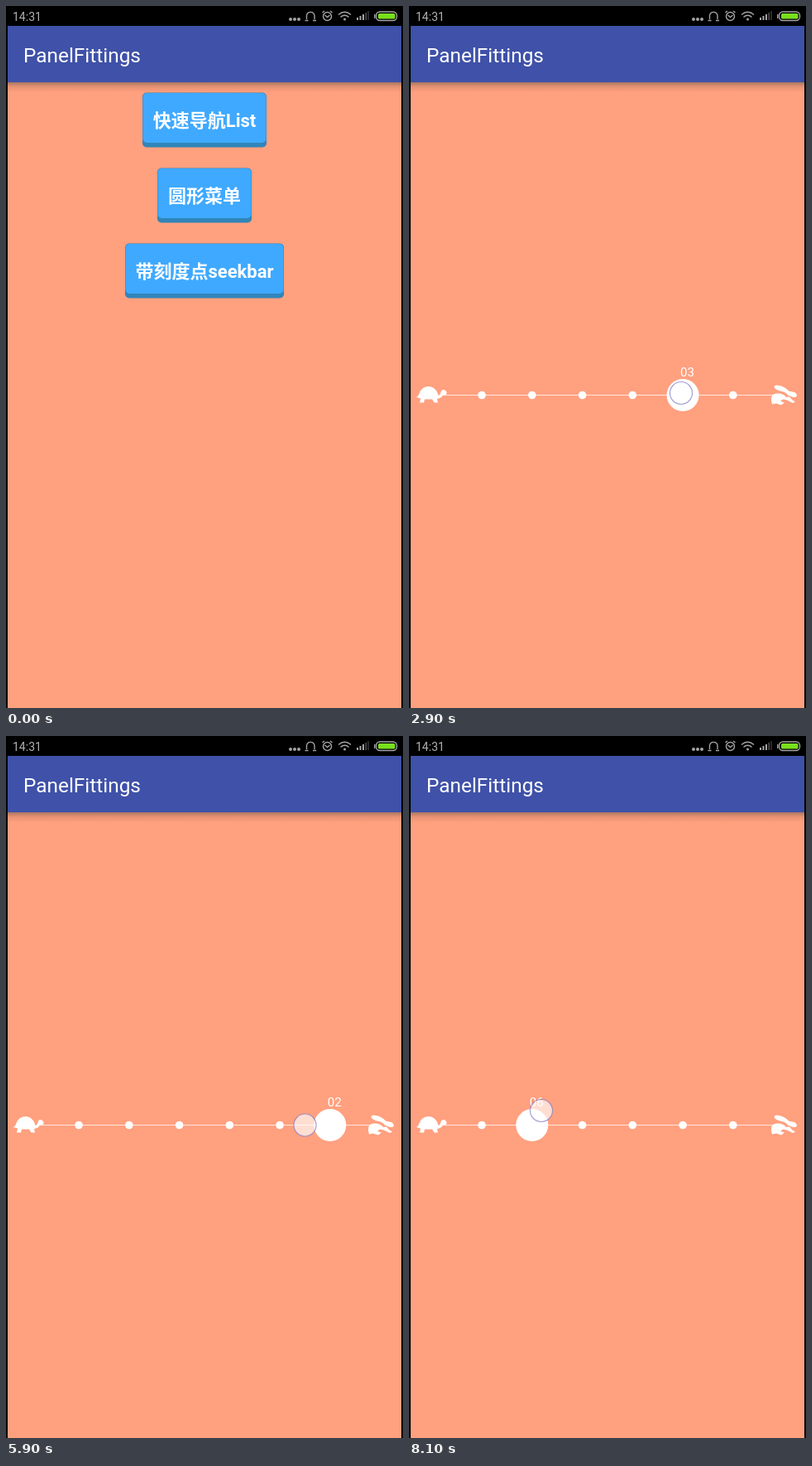
These frames come from a looping animation (480x847 px, 8200 ms). An HTML page:

```html
<!DOCTYPE html>
<html lang="zh">
<head>
<meta charset="utf-8">
<style>
html, body { margin: 0; width: 100%; height: 100%; overflow: hidden; background: #000; }
svg { display: block; width: 480px; height: 847px; }
text { font-family: Roboto, "Noto Sans CJK SC", "Noto Sans CJK", sans-serif; fill: #fff; }
.button text { font-size: 22px; font-weight: 700; text-anchor: middle; }
.line { fill: none; stroke: #a4a4a4; stroke-width: 1.4; }
</style>
</head>
<body>
<svg viewBox="0 0 480 847">
  <defs>
    <linearGradient id="shade" x2="0" y2="1">
      <stop stop-color="#a87662"/><stop offset=".45" stop-color="#e69273"/>
      <stop offset="1" stop-color="#ffa07f"/>
    </linearGradient>
    <g id="page">
      <rect y="24" width="480" height="823" fill="#ffa07f"/>
      <rect y="92" width="480" height="12" fill="url(#shade)"/>
      <rect y="24" width="480" height="68" fill="#3f51a8"/>
      <text x="21" y="68" font-size="24.4">PanelFittings</text>
    </g>
  </defs>

  <g id="home"><use href="#page"/></g>

  <g id="seek">
    <use href="#page"/>
    <path d="M40 469.5H442" stroke="#fff" stroke-opacity=".75"/>
    <g id="dots" fill="#fff"></g>
    <g fill="#fff">
      <path d="M9 472Q12 470 12.500 467Q16 459 23.500 459Q31 459 34.500 467L35.500 470Q38 469 38.500 466Q39 463 42 463Q46 464 45.500 468Q43 470 41 469Q40 473 34 474L35 478.500H30.500L28 474.500H19L18 478.500H13L14 473.500Z"/>
      <path d="M441.500 459.500Q442 456.500 448 458Q455 459.500 459 464.500L466 466Q469 467.500 469 470.500Q467 473 463 471.500L458 469.500Q456 466 451 465Q442 463 441.500 459.500Z"/>
      <path d="M438 476Q437 467 446 467.500Q453 467.500 456 472L460 471.500L463 475L467 477.500L464 479L457 475.500L452 474.500L449 477L454 478.500L450 481.500L444 479.500L439 480.500Z"/>
    </g>
    <g id="thumb">
      <circle cy="469.500" r="19.500" fill="#fff"/>
      <text id="label" x="-3" y="446.500" font-size="15"></text>
    </g>
  </g>

  <circle id="finger" r="13.500" fill="#fff" fill-opacity=".65" stroke="#857dc4" stroke-opacity=".75" stroke-width="1.200"/>

  <path d="M0 0H480V847H478V24H2V847H0Z"/>
  <text x="8" y="17.500" font-size="14" style="fill:#b0b0b0">14:31</text>
  <g fill="#a4a4a4">
    <circle cx="344" cy="16" r="2"/><circle cx="349" cy="16" r="2"/><circle cx="354" cy="16" r="2"/>
    <path d="M424 14h2v3h-2zM427.500 12h2v5h-2zM431 10h2v7h-2z"/>
    <path d="M434.500 8h1.500v9h-1.500zM437.500 6h1v11h-1z" fill="#555"/>
    <circle cx="409.500" cy="16" r="1.500"/>
  </g>
  <g class="line">
    <path d="M363.500 16V11.500A4.800 4.800 0 0 1 373 11.500V16M361.500 17.500H365.500M371 17.500H375"/>
    <circle cx="388.500" cy="12.500" r="5"/>
    <path d="M385.500 11L388.500 13.500L391.500 11M382.500 8L385 6M392 6L394.500 8"/>
    <path d="M402 10.500Q409.500 4 417 10.500M404.500 13.500Q409.500 9 414.500 13.500"/>
    <rect x="447.500" y="7" width="25" height="10.500" rx="4.500"/>
    <path d="M445.700 10V15"/>
  </g>
  <rect x="450" y="9" width="20.500" height="6.500" rx="1.500" fill="#78e01c"/>
</svg>
<script>
const $ = id => document.getElementById(id);
const move = (id, x, y = 0) => $(id).setAttribute("transform", `translate(${x} ${y})`);
const LOOP = 8200, STEP = 100;
const stopX = i => 27.3 + 60.75 * i;

const buttons = [
  ["list", "快速导航List", 104.5, 150],
  ["menu", "圆形菜单", 195.5, 114],
  ["ticks", "带刻度点seekbar", 286.5, 192]
];
$("home").innerHTML += buttons.map(([id, label, y, w]) => `
  <g class="button">
    <rect x="${240 - w / 2}" y="${y}" width="${w}" height="66" rx="5" fill="#3185b8"/>
    <g id="${id}">
      <rect x="${240.5 - w / 2}" y="${y + 0.5}" width="${w - 1}" height="60" rx="5" fill="#3fa9ff"/>
      <text x="240" y="${y + 41.5}">${label}</text>
    </g>
  </g>`).join("");

for (let i = 1; i < 7; i++)
  $("dots").innerHTML += `<circle cx="${stopX(i)}" cy="469.500" r="4.800"/>`;

// Each gesture is a list of [time, x, y]; the finger lifts after the last point.
const press = [[1500, 250, 322], [1900, 250, 322]];
const drags = [
  [[2900, 329, 467], [3700, 186, 457], [4000, 140, 455]],
  [[4800, 150, 462], [5300, 273, 464], [6500, 450, 475], [6600, 451, 475]],
  [[7000, 450, 473], [8100, 160, 452]]
];

function pointAt(path, t) {
  const n = path.findIndex(p => p[0] >= t);
  if (n < 0 || t < path[0][0]) return null;
  if (n === 0) return path[0].slice(1);
  const [a, b] = [path[n - 1], path[n]];
  const k = (t - a[0]) / (b[0] - a[0]);
  return [a[1] + (b[1] - a[1]) * k, a[2] + (b[2] - a[2]) * k];
}

function stopAt(t) {
  let x = stopX(5);
  for (const path of drags)
    if (t >= path[0][0]) x = pointAt(path, Math.min(t, path.at(-1)[0]))[0];
  return Math.max(0, Math.min(7, Math.round((x - stopX(0)) / 60.75)));
}

function draw(now) {
  const t = Math.floor(now % LOOP / STEP) * STEP;

  const k = Math.max(0, Math.min(1, (t - 2000) / 400));
  const slide = 1 - (1 - k) ** 2;
  move("home", -120 * slide);
  move("seek", 480 * (1 - slide));
  move("ticks", 0, pointAt(press, t) ? 3 : 0);

  const stop = stopAt(t);
  move("thumb", stopX(stop));
  $("label").textContent = "0" + (8 - stop);

  const touch = [press, ...drags].map(path => pointAt(path, t)).find(Boolean);
  $("finger").style.display = touch ? "" : "none";
  if (touch) move("finger", ...touch);
}

const start = performance.now();
(function tick() {
  draw(performance.now() - start);
  requestAnimationFrame(tick);
})();
</script>
</body>
</html>
```
